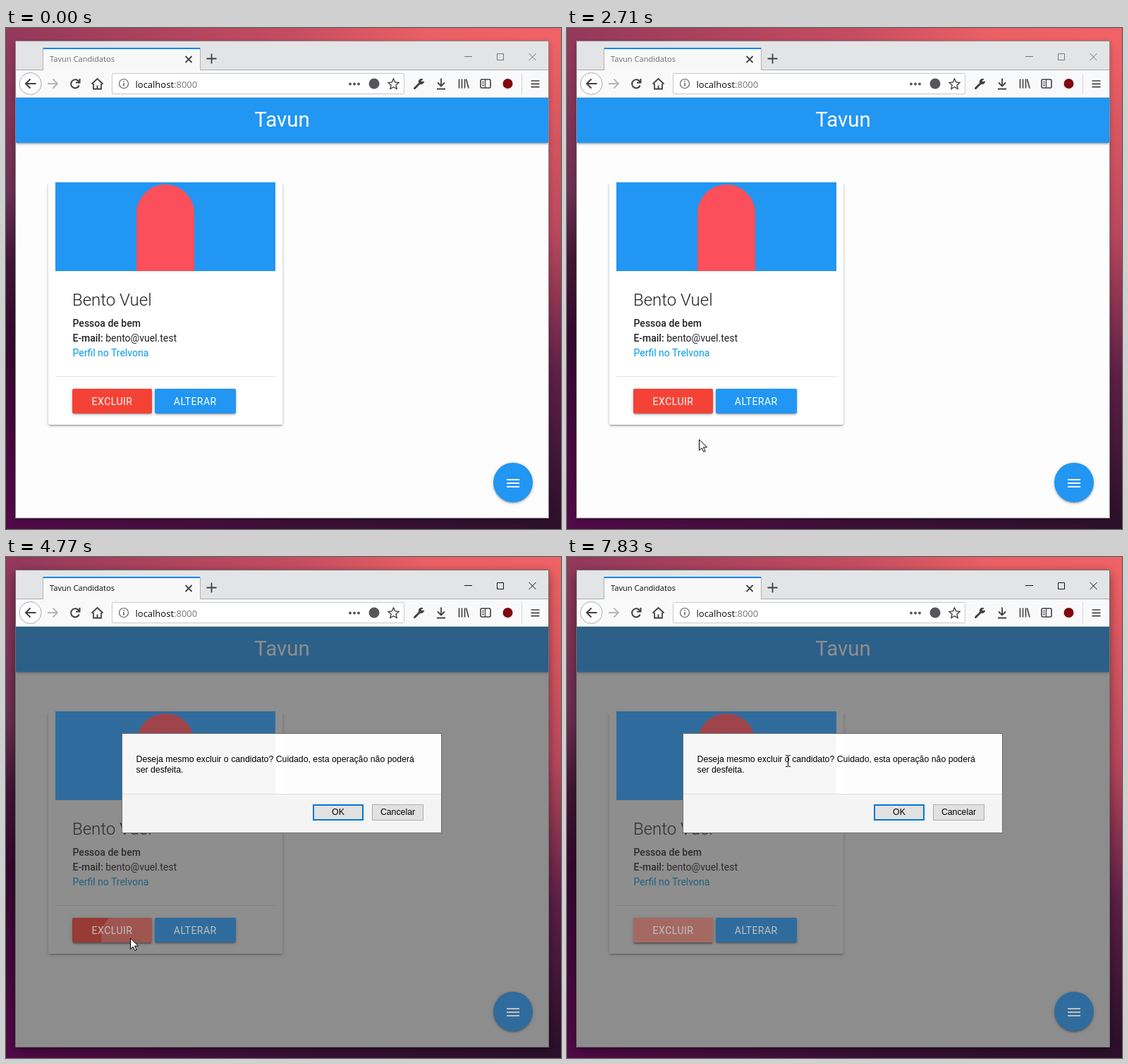
Recreate the animation shown at these times as an HTML page. Size 787 by 711 pixels, loop 8 s.

```html
<!DOCTYPE html>
<html lang="pt-BR">
<head>
<meta charset="utf-8">
<title>Tavun Candidatos</title>
<style>
html, body { margin: 0; width: 100%; height: 100%; overflow: hidden; }
#stage { position: absolute; left: 0; top: 0; width: 787px; height: 711px; overflow: hidden; background: #3a1038; }
#stage div, svg { position: absolute; box-sizing: border-box; }
svg { left: 0; top: 0; overflow: visible; }
.rob { font-family: Roboto, sans-serif; font-size: 14px; }
.ui { font-family: "Open Sans", sans-serif; }
.dlg { font-family: "Liberation Sans", Arial, sans-serif; font-size: 12.3px; }

.top { left: 0; top: 0; width: 787px; height: 20px; background: linear-gradient(90deg, #93385a, #c64d61 52%, #eb6064 76%, #f06265); }
.left { left: 0; top: 19px; width: 15px; height: 677px; background: linear-gradient(#93385a, #6a3052 32%, #421735 46%, #35092f 62%, #520a48); }
.right { left: 768px; top: 19px; width: 19px; height: 677px; background: linear-gradient(#f06265, #b9485c 40%, #5c1f46 70%, #2d102b); }
.bottom { left: 0; top: 694px; width: 787px; height: 17px; background: linear-gradient(90deg, #520a48, #3b1036 55%, #2d102b); }

.win { left: 14px; top: 19px; width: 755px; height: 676px; background: #fdfdfd; box-shadow: 0 0 0 1px #8f8a8f, 0 2px 8px rgba(0,0,0,.3); }
.on .win { box-shadow: 0 0 0 1px #6f7074, 0 4px 14px rgba(0,0,0,.5); }
.strip { left: 14px; top: 19px; width: 755px; height: 41px; background: #e3e4e6; border-bottom: 1px solid #a9abad; }
.tab { left: 52px; top: 28px; width: 224px; height: 32px; background: #f8f8f9; border: solid #b0b2b4; border-width: 0 1px; }
.tab::before { content: ""; position: absolute; left: 0; top: 0; width: 222px; height: 2px; background: #0a84ff; }
.tools { left: 14px; top: 60px; width: 755px; height: 39px; background: #f9f9fa; border-bottom: 1px solid #ccc; }
.url { left: 150px; top: 64px; width: 415px; height: 30px; background: #fff; border: 1px solid #c9cacc; border-radius: 2px; }
.head { left: 14px; top: 99px; width: 755px; height: 64px; background: #2196f3; clip-path: inset(0 0 -9px); }
.card { left: 60px; top: 218px; width: 332px; height: 345px; background: #fff; border-radius: 2px; clip-path: inset(4px -9px -9px); }
.head, .card, .btn, .fab { box-shadow: 0 2px 2px rgba(0,0,0,.14), 0 3px 1px -2px rgba(0,0,0,.12), 0 1px 5px rgba(0,0,0,.2); }
.rule { left: 70px; top: 494px; width: 312px; height: 1px; background: #e2e2e2; }
.veil { left: 14px; top: 99px; width: 755px; height: 596px; background: rgba(54,54,54,.56); visibility: hidden; }
.pic { left: 70px; top: 218.5px; width: 312px; height: 126.5px; background: #2196f3; overflow: hidden; }
.pic div { left: 115px; top: 3px; width: 82px; height: 170px; border-radius: 41px; background: #fb505b; }
.btn { top: 511.5px; height: 35.5px; border-radius: 2px; color: #fff; text-align: center; line-height: 36px; letter-spacing: .5px; overflow: hidden; }
.del { left: 94px; width: 113px; background: #f44336; }
.edit { left: 210.5px; width: 115.5px; background: #2196f3; }
.del.hover { box-shadow: 0 3px 3px rgba(0,0,0,.14), 0 1px 7px rgba(0,0,0,.12), 0 3px 1px -1px rgba(0,0,0,.2); }
#wave { border-radius: 50%; background: #fff; }
.fab { left: 691px; top: 617px; width: 55.5px; height: 55.5px; border-radius: 50%; background: #2196f3; }
.fab::before { content: ""; position: absolute; left: 19px; top: 22.5px; width: 17.5px; height: 2px; background: #fff; box-shadow: 0 5px #fff, 0 10px #fff; }
.dim .veil, .dim .dialog { visibility: visible; }
.dim .lit { filter: saturate(.7) brightness(.75); }

.dialog { left: 164px; top: 250px; width: 454px; height: 142px; background: #f4f4f4; border: 1px solid #6c6c6c; visibility: hidden; }
.body { left: 0; top: 0; width: 452px; height: 86px; border-bottom: 1px solid #dfdfdf; background: linear-gradient(90deg, #f7f7f7 217px, #fff 217px 232px, #fdfdfd 232px); }
.key { top: 100px; height: 23px; background: #e1e1e1; }
.ok { left: 270px; width: 72px; border: 2px solid #0078d7; }
.no { left: 354px; width: 73px; border: 1px solid #adadad; }

.tone { color: #777; }
.tab-name { fill: #6d6e72; }
.on .tone { color: #111; }
.on .tab-name { fill: #0c0c0d; }
</style>
</head>
<body>
<div id="stage">
  <div class="top"></div><div class="left"></div><div class="right"></div><div class="bottom"></div>
  <div class="win"></div>
  <div class="strip"></div><div class="tab"></div>
  <div class="tools"></div><div class="url"></div>
  <div class="card"></div><div class="rule"></div>
  <div class="head"></div>

  <svg width="787" height="711" fill="none" stroke="#3f4044" stroke-width="1.8">
    <g class="ui" stroke="none">
      <text class="tab-name" x="62" y="48" font-size="11.1">Tavun Candidatos</text>
      <text x="183.5" y="84.5" font-size="13" fill="#0c0c0d">localhost<tspan fill="#75767a">:8000</tspan></text>
    </g>
    <path d="M254.5 40l9 9m0-9l-9 9M284.5 43.5h14m-7-7v14"/>
    <g class="tone" stroke="currentColor" stroke-width="1">
      <path d="M650 40.5h11M696.5 36.5h9v9h-9zM741.5 36l10 10m0-10l-10 10"/>
    </g>
    <circle cx="34.5" cy="79" r="15.5" fill="#fff" stroke="#aaa" stroke-width="1"/>
    <path d="M42.5 79H28m6.5-6.5L28 79l6.5 6.5" stroke-width="2"/>
    <path d="M59 79h14m-6.5-6.5L73 79l-6.5 6.5" stroke="#b5b5b7"/>
    <path d="M103.5 76.5a6 6 0 1 0 .2 5M104.5 72v5.5H99" stroke-width="2"/>
    <path d="M121.5 79.5l8-7.5 8 7.5M124 79v7.5h11V79M129.5 86v-4.5"/>
    <g stroke-width="1.2" stroke="#606166">
      <circle cx="167" cy="79" r="6.5"/><path d="M167 78v4.5M167 75v1.5" stroke-width="1.6"/>
    </g>
    <g fill="#55565a" stroke="none">
      <circle cx="488" cy="79.5" r="2"/><circle cx="494" cy="79.5" r="2"/><circle cx="500" cy="79.5" r="2"/>
      <circle cx="522" cy="79" r="7.5"/>
      <circle cx="711.5" cy="79" r="7" fill="#800610"/>
    </g>
    <path d="M549.5 72l2.2 4.9 5.3.6-4 3.6 1.1 5.3-4.6-2.7-4.6 2.7 1.1-5.3-4-3.6 5.3-.6z" stroke-width="1.4"/>
    <path d="M579.5 85.5l7-7" stroke-width="3" stroke-linecap="round"/>
    <path d="M591 73a3.6 3.6 0 1 0 1.5 3l-3.5.5-1-2z" fill="#3f4044" stroke-width="1"/>
    <path d="M617 71.5v11m-5-5l5 5 5-5M611 86.5h12"/>
    <path d="M642.5 72.5v13m4-13v13m4-13v13m2-13l3.5 13" stroke-width="1.6"/>
    <rect x="673" y="73" width="14" height="12" rx="1.5" stroke-width="1.6"/>
    <path d="M679.5 73v12M675 76.5h3m-3 2.5h3m-3 2.5h3" stroke-width="1.2"/>
    <path d="M731.5 64v31" stroke="#d5d6d8" stroke-width="1"/>
    <path d="M744.5 75h12m-12 4.3h12m-12 4.3h12" stroke-width="1.7"/>

    <g class="rob" stroke="none" fill="#212121">
      <text x="391.5" y="140" font-size="29.4" text-anchor="middle" fill="#fff">Tavun</text>
      <text x="94" y="393.5" font-size="24" font-weight="300">Bento Vuel</text>
      <text x="94.5" y="424" font-weight="500">Pessoa de bem</text>
      <text x="94.5" y="445"><tspan font-weight="500">E-mail:</tspan> bento@vuel.test</text>
      <text x="94.5" y="466" fill="#039be5">Perfil no Trelvona</text>
    </g>
  </svg>

  <div class="veil"></div>
  <div class="pic lit"><div></div></div>
  <div class="btn del lit rob" id="del">EXCLUIR<div id="wave"></div></div>
  <div class="btn edit lit rob">ALTERAR</div>
  <div class="fab lit"></div>

  <div class="dialog">
    <div class="body"></div><div class="key ok"></div><div class="key no"></div>
    <svg class="dlg" width="452" height="140" fill="#000">
      <text x="19.5" y="40">Deseja mesmo excluir o candidato? Cuidado, esta operação não poderá</text>
      <text x="19.5" y="55">ser desfeita.</text>
      <text x="306" y="115" text-anchor="middle">OK</text>
      <text x="390.5" y="115" text-anchor="middle">Cancelar</text>
    </svg>
  </div>

  <svg width="787" height="711">
    <g id="arrow" fill="#fff" stroke="#000">
      <path d="M.5 1v15.5l3.6-3.5 2.7 5.5 2.3-1-2.6-5.5h5z"/>
    </g>
    <g id="hand" fill="#fff" stroke="#000" stroke-width="1.1">
      <path d="M5.5 13V2.200a1.700 1.700 0 0 1 3.400 0V7a1.500 1.500 0 0 1 2.800.6 1.500 1.500 0 0 1 2.700.7 1.400 1.400 0 0 1 2.400 1V15q0 3-2 5v2H6.600v-2Q3.500 17 1 13q-.8-2 .8-2.200T5.500 13z"/>
      <path d="M8.9 7v4m2.800-3.400V11m2.700-2.700V11"/>
    </g>
    <g id="beam" fill="none" stroke="#000">
      <path d="M-3-7.500H0M1-7.500H4M.5-7V8M-3 8.500H0M1 8.500H4"/>
    </g>
  </svg>
</div>
<script>
const $ = id => document.getElementById(id);
const LOOP = 8000, BEAT = 75, PRESS = 4630;

// Pointer legs: start, end, shape, then a point or a quadratic curve.
const legs = [
  [60, 300, "arrow", [643, 640], [620, 550], [573, 498]],
  [1540, 1540, "arrow", [581, 497]],
  [1830, 2570, "arrow", [575, 498], [325, 697], [190, 595]],
  [2650, 2790, "arrow", [187, 583], [181, 563], [176, 548]],
  [2930, 3150, "hand", [178, 547], [220, 545], [171, 543]],
  [3390, 3390, "hand", [170.5, 539.5]],
  [4690, 4690, "arrow", [176, 540]],
  [5660, 5885, "arrow", [195, 490], [240, 385], [220, 346]],
  [5960, 6040, "beam", [204, 305], [201, 299], [198, 293]],
  [6250, 6570, "beam", [194, 289], [183, 283], [187, 291]],
  [6950, 6950, "beam", [191, 296]],
  [7090, 7090, "beam", [188, 286]],
  [7230, 7830, "beam", [192, 287], [245, 297], [313, 289]]
];

function pointer(t) {
  const leg = legs.findLast(l => l[0] <= t);
  if (!leg) return ["", 0, 0];
  const [start, end, kind, a, b = a, c = a] = leg;
  const n = Math.max(1, Math.round((end - start) / BEAT));
  const p = t >= end ? 1 : Math.floor((t - start) / (end - start) * n) / n;
  const q = 1 - p;
  const mix = i => Math.round(q * q * a[i] + 2 * q * p * b[i] + p * p * c[i]);
  return [kind, mix(0), mix(1)];
}

function draw(t) {
  const [kind, x, y] = pointer(t);
  for (const id of ["arrow", "hand", "beam"]) {
    $(id).style.display = id === kind ? "" : "none";
    $(id).setAttribute("transform", `translate(${x} ${y})`);
  }

  // The ripple spreads in five quick steps after the press.
  const k = Math.min(5, Math.floor((t - PRESS + 10) / 70));
  const r = t < PRESS ? 0 : 5 + 8 * k + 5 * k * k;
  $("wave").style.cssText =
    `left:${82 - r}px;top:${28.5 - r}px;width:${2 * r}px;height:${2 * r}px;opacity:${0.1 + 0.05 * k}`;

  $("stage").classList.toggle("on", t >= PRESS);
  $("stage").classList.toggle("dim", k >= 2);
  $("del").classList.toggle("hover", t >= 2930);
}

const start = performance.now();
function tick() {
  draw((performance.now() - start) % LOOP);
  requestAnimationFrame(tick);
}
tick();
</script>
</body>
</html>
```
